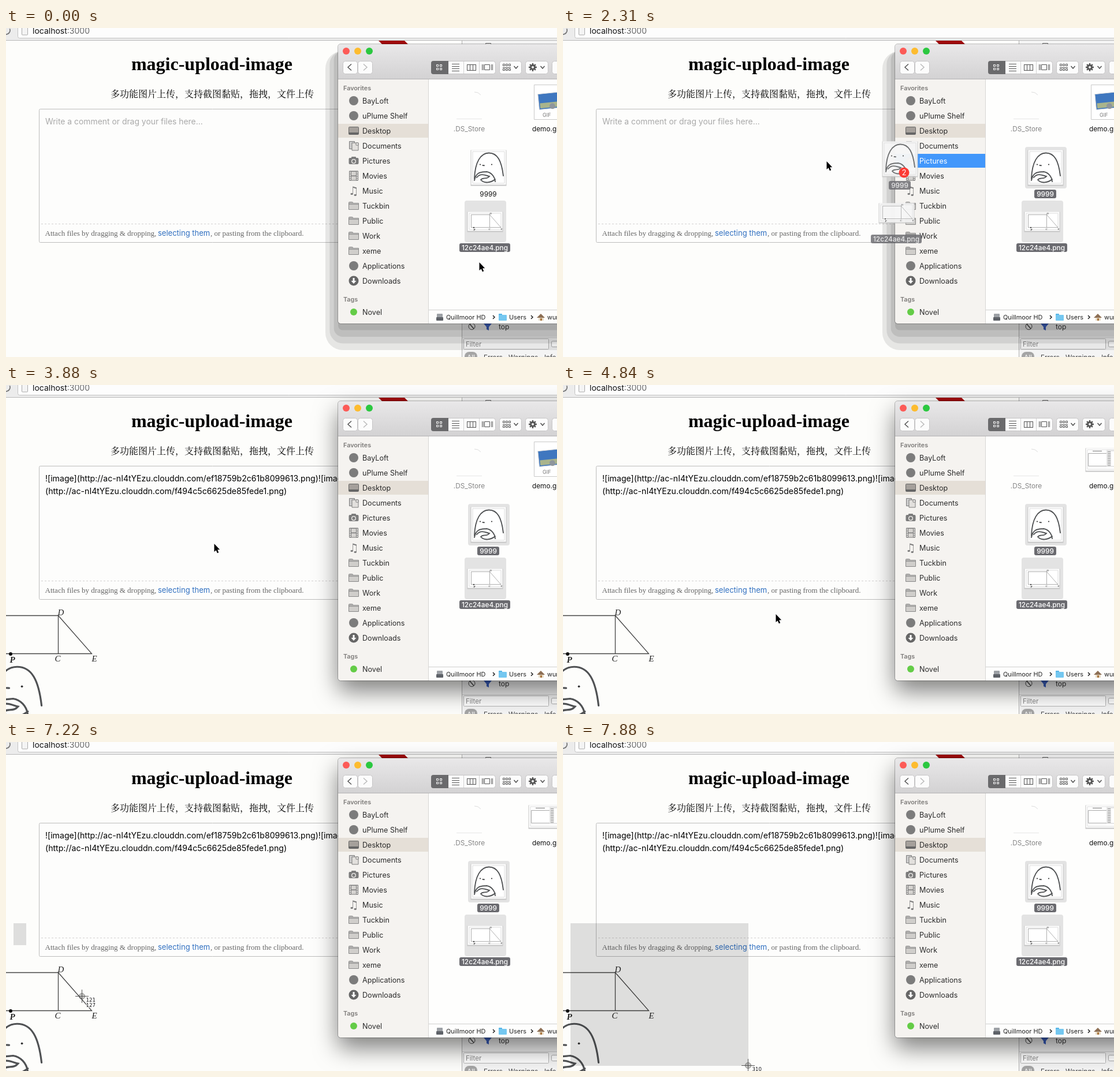
An HTML page with a canvas for the animation above (8 s loop, 954 by 570 pixels).

```html
<!DOCTYPE html>
<html lang="en">
<head>
<meta charset="utf-8">
<title>magic-upload-image</title>
<style>
html, body { margin: 0; width: 100%; height: 100%; overflow: hidden; background: #fdfdfb; }
canvas { display: block; }
</style>
</head>
<body>
<canvas id="stage" width="954" height="570"></canvas>
<script>
const c = document.getElementById('stage').getContext('2d');
const LOOP = 8000, LAG = 90;
const SANS = 'Inter, Roboto, sans-serif';
const SERIF = '"Liberation Serif", serif';
const CJK = '"Noto Serif CJK SC", "Noto Sans CJK SC", "Noto Sans CJK", sans-serif';
const GREY = '#7c7c7c', INK = '#2b2b2b';

// Moments of the story, in ms
const CLEAR = 480, PICK = 1100, BAND = 1384, BOTH = 1600, GRAB = 1870, DROP = 3170,
  DONE = 3640, PREVIEW = 3800, THUMB = 3990, CROSS = 6290, MARK = 7090;

const linear = k => k, easeOut = k => 1 - (1 - k) ** 2;
const legs = [];
const go = (from, to, x, y, ease = linear) => legs.push({ from, to, x, y, ease });

go(CLEAR, 860, 858, 247);
go(PICK, 1250, 872, 411);
go(BAND, 1520, 869, 281);
go(1520, BOTH, 834, 245);
go(GRAB, 2220, 583, 230);
go(2220, 2310, 456, 231);
go(2310, 2910, 362, 209);
go(DONE, 4430, 355, 424);
go(4520, 4840, 368, 397);
go(4840, 5020, 355, 404);
go(5340, 5520, 366, 401);
go(5880, 6140, 348, 402);
go(CROSS, 7010, 13, 314);
go(MARK, 7130, 33, 350);
go(7130, 7220, 130, 440);
go(7220, 7790, 320, 560, easeOut);

function pos(t) {
  let x = 819, y = 406;
  for (const l of legs) {
    if (t <= l.from) break;
    const k = l.ease(Math.min(1, (t - l.from) / (l.to - l.from)));
    x += (l.x - x) * k;
    y += (l.y - y) * k;
  }
  return { x: Math.round(x), y: Math.round(y) };
}

function paint(fill, stroke, width = 1) {
  if (fill) { c.fillStyle = fill; c.fill(); }
  if (stroke) { c.strokeStyle = stroke; c.lineWidth = width; c.stroke(); }
}

function rect(x, y, w, h, fill) { c.fillStyle = fill; c.fillRect(x, y, w, h); }

function box(x, y, w, h, r, fill, stroke) {
  c.beginPath(); c.roundRect(x, y, w, h, r); paint(fill, stroke);
}

function disc(x, y, r, fill, stroke) {
  c.beginPath(); c.arc(x, y, r, 0, 7); paint(fill, stroke);
}

function poly(points, stroke, width = 1, fill) {
  c.beginPath();
  points.forEach(([x, y]) => c.lineTo(x, y));
  if (fill) c.closePath();
  paint(fill, stroke, width);
}

function text(s, x, y, font, fill, align = 'left') {
  c.font = font; c.fillStyle = fill; c.textAlign = align;
  c.fillText(s, x, y);
}

function at(x, y, k, draw) {
  c.save(); c.translate(x, y); c.scale(k, k); draw(); c.restore();
}

const repeat = (n, fn) => { for (let i = 0; i < n; i++) fn(i); };

// The two uploaded pictures, shared by thumbnails and previews
function sketch() {
  c.lineCap = 'round';
  c.beginPath();
  c.moveTo(3, 47); c.bezierCurveTo(4, 18, 14, 2.5, 28, 2.5);
  c.bezierCurveTo(43, 2.5, 50, 16, 53, 42);
  c.moveTo(3, 50); c.bezierCurveTo(6, 34, 16, 36, 24, 35);
  c.bezierCurveTo(31, 36, 38, 42, 39, 52);
  c.moveTo(7, 45); c.bezierCurveTo(14, 36, 24, 42, 29, 43);
  c.bezierCurveTo(24, 49, 18, 44, 14, 49);
  c.bezierCurveTo(20, 56, 32, 54, 39, 48);
  c.moveTo(17.5, 24); c.lineTo(20, 24.2);
  paint(null, '#505254', 1.9);
  disc(13, 22.5, 1.1, '#333'); disc(33, 22.5, 1.1, '#333');
}

function figure() {
  poly([[-96, 66], [-96, 0], [0, 0], [58, 66], [-96, 66]], '#444', 1.3);
  poly([[0, 0], [0, 66]], '#444', 1.3);
  disc(-82.5, 66.5, 3, '#111');
  const f = 'italic 15px ' + SERIF;
  text('D', -1, -1, f, '#222'); text('C', -6, 79, f, '#222'); text('E', 58, 79, f, '#222');
  text('P', -84, 81, 'bold ' + f, '#222');
}

function frame(x, y, w, h) {
  rect(x - .5, y + .5, w + 2, h + 2, '#c6c6c6');
  rect(x + .5, y + .5, w, h, '#fff');
  box(x + 3, y + 3, w - 5, h - 5, 0, null, '#dcdcdc');
}

function sketchThumb() {
  frame(805, 211, 60, 60);
  at(808, 214, 1, sketch);
}

function figureThumb() {
  frame(799, 318, 60, 33);
  at(837.5, 323.5, 1 / 3, figure);
}

function label(s, x, y, w, on) {
  if (on) box(x - w / 2, y - 7.5, w, 15, 3, '#6b6b70');
  text(s, x, y + 4.3, (on ? '500 ' : '') + '11.8px ' + SANS, on ? '#fff' : '#111', 'center');
}

function file(thumb, name, x, y, w, on) {
  if (on) box(x, y, 72, 72, 4, '#e3e3e3');
  thumb();
  label(name, x + 35, y + 81.5, w, on);
}

function page(t) {
  rect(0, 0, 954, 570, '#fdfdfb');
  rect(0, 0, 954, 21, '#ececec');
  rect(0, 21, 954, 1, '#b9b9b9');
  box(20.5, -8, 980, 25.5, 3, '#fdfdfd', '#c2c2c2');
  c.beginPath(); c.arc(0, 4, 7, -.4, 2.2); paint(null, '#777', 1.8);
  box(27.5, -4, 10, 16, 1, '#f4f4f4', '#aaa');
  text('localhost', 46, 10, '14px ' + SANS, '#111');
  text(':3000', 46 + c.measureText('localhost').width, 10, '14px ' + SANS, '#666');
  poly([[645, 22], [690, 22], [698, 30], [653, 30]], null, 1, '#a00a0c');

  text('magic-upload-image', 356.5, 73, 'bold 32px ' + SERIF, '#000', 'center');
  text('多功能图片上传，支持截图黏贴，拖拽，文件上传', 181, 120, '500 16px ' + CJK, '#000');

  const busy = t >= DROP && t < DONE;
  box(57.5, 140.5, 600, busy ? 230 : 231, 2, '#fdfdfc', '#bcbcbc');
  c.setLineDash([3, 3]);
  poly([[61, 339.5], [600, 339.5]], '#d2d0d0');
  c.setLineDash([]);

  if (t >= DONE) {
    const body = '14.12px ' + SANS;
    text('![image](http://ac-nI4tYEzu.clouddn.com/ef18759b2c61b8099613.png)![image]', 68, 167, body, '#000');
    text('(http://ac-nI4tYEzu.clouddn.com/f494c5c6625de85fede1.png)', 68, 189, body, '#000');
  } else text('Write a comment or drag your files here...', 68, 167, '13.9px ' + SANS, '#a9a9a9');

  const note = '13px ' + SERIF;
  if (busy) text('Uploading your files… 100', 67.5, 359, note, '#555');
  else {
    text('Attach files by dragging & dropping,', 67.5, 360, note, '#666');
    text('selecting them', 263, 360, '13px ' + SANS, '#2f6fc0');
    text(', or pasting from the clipboard.', 354, 360, note, '#666');
  }
  if (t >= PREVIEW) {
    at(90.5, 399.5, 1, figure);
    at(-28.5, 484, 1.7, sketch);
  }
}

function devtools() {
  rect(789, 22, 165, 548, '#f4f4f4');
  rect(789, 22, 1, 548, '#b0b0b0');
  box(830.5, 26.5, 9, 8, 0, null, '#666');
  rect(790, 536, 164, 1, '#cfcfcf');
  disc(806.5, 517, 5.5, null, '#444'); poly([[803, 513], [810, 521]], '#444', 1.5);
  poly([[827, 512], [841, 512], [836, 518], [836, 524], [832, 522], [832, 518]], null, 1, '#3c62c4');
  text('top', 853, 522, '12px ' + SANS, '#333');
  box(792.5, 538.5, 147, 18, 1, '#fff', '#b5b5b5');
  text('Filter', 796, 552, '11.5px ' + SANS, '#8a8a8a');
  box(944.5, 542.5, 16, 10, 2, '#fff', '#aaa');
  box(794, 561, 22, 16, 8, '#a5a5a5');
  const tabs = '11.5px ' + SANS;
  text('All', 805, 575, tabs, '#fff', 'center');
  text('Errors', 827, 575, tabs, '#444');
  text('Warnings', 870, 575, tabs, '#444');
  text('Info', 932, 575, tabs, '#444');
}

function bandedShadow() {
  repeat(4, i => {
    const k = 1 - i / 3, bottom = 558 - 11.5 * i;
    box(575 - 22 * k, 40, 500, bottom - 40, 8 + 22 * k, 'rgba(0,0,0,.09)');
  });
}

function softShadow() {
  c.save();
  c.shadowColor = 'rgba(0,0,0,.5)'; c.shadowBlur = 40; c.shadowOffsetY = 18;
  box(575, 28, 500, 484, 5, '#fff');
  c.restore();
}

// Sidebar icons, each drawn around 0,0
const icons = {
  dot() { disc(0, 0, 8, GREY); },
  desktop() { box(-8.5, -6.5, 17, 13, 1, '#a5a09b', '#666'); rect(-8, 3, 16, 3, '#666'); },
  docs() {
    box(-7.5, -7.5, 9, 13, 0, '#ccc', GREY);
    box(-3, -5, 11, 13, 0, '#e2e0dd', GREY);
    box(4, -5, 4, 4, 0, '#f4f2ef', GREY);
  },
  camera() {
    box(-8.5, -5, 17, 11, 2, GREY); box(-4, -7, 8, 4, 1, GREY);
    disc(0, 1, 4, '#f3f1ee'); disc(0, 1, 2.7, GREY);
  },
  film() {
    box(-8, -8.5, 16, 17, 1, GREY);
    rect(-4, -7, 8, 6.5, '#d5d3d0'); rect(-4, 1, 8, 6.5, '#d5d3d0');
    repeat(5, i => { rect(-7, 3 * i - 7, 2, 2, '#f3f1ee'); rect(5, 3 * i - 7, 2, 2, '#f3f1ee'); });
  },
  note() { text('♫', 0, 7, '20px "DejaVu Sans", sans-serif', GREY, 'center'); },
  folder() {
    box(-8.5, -6.5, 7, 5, 1, '#d0cecb', '#888');
    box(-8.5, -4.5, 17, 11, 0, '#d0cecb', '#888');
    rect(-8, -3, 16, 1, '#888');
  },
  down() {
    disc(0, 0, 8.5, '#666');
    rect(-1.5, -5, 3, 6, '#fff');
    poly([[-4.5, 0], [4.5, 0], [0, 5]], null, 1, '#fff');
  }
};
const rows = [['BayLoft', 'dot'], ['uPlume Shelf', 'dot'], ['Desktop', 'desktop'], ['Documents', 'docs'],
  ['Pictures', 'camera'], ['Movies', 'film'], ['Music', 'note'], ['Tuckbin', 'folder'], ['Public', 'folder'],
  ['Work', 'folder'], ['xeme', 'folder'], ['Applications', 'dot'], ['Downloads', 'down']];

function sidebar(hover) {
  rect(575, 89, 156, 423, '#f5f3f0');
  rect(731, 89, 1, 423, '#d8d6d4');
  const head = '600 10.8px ' + SANS, item = '12.6px ' + SANS;
  text('Favorites', 584, 108, head, '#7d7b79');
  rows.forEach(([name, icon], i) => {
    const y = 126 + 26 * i;
    if (i === 2) rect(575, y - 12, 156, 24, '#e5dfd7');
    if (i === hover) rect(575, y - 12, 156, 24, '#4297fb');
    at(602, y, 1, icons[icon]);
    text(name, 617, y + 4.7, item, i === hover ? '#fff' : INK);
  });
  text('Tags', 584, 474, head, '#7d7b79');
  disc(602, 492, 6, '#64cc47');
  text('Novel', 617, 496.7, item, INK);
}

function chevron(x, y, w, h, color) {
  poly([[x - w, y - h], [x, y], [x - w, y + h]], color, 1.5);
}

function caret(x, y) { poly([[x - 3.5, y - 2], [x, y + 2], [x + 3.5, y - 2]], '#555', 1.5); }

function button(x, w) { box(x + .5, 57.5, w, 22, 4, '#fcfcfc', '#c6c5c6'); }

function toolbar() {
  const g = c.createLinearGradient(0, 28, 0, 88);
  g.addColorStop(0, '#e9e8e9'); g.addColorStop(1, '#d3d2d3');
  rect(575, 28, 379, 60, g);
  rect(575, 88, 379, 1, '#b4b3b4');
  ['#fc5b57', '#fdbc2f', '#2bc840'].forEach((f, i) => disc(589 + 20 * i, 40, 6, f));

  button(583, 25); chevron(592, 68, -6, 5.5, '#555');
  button(609, 25); chevron(625, 68, 6, 5.5, '#bbb');

  button(736, 111);
  box(736, 57, 30, 23, [4, 0, 0, 4], '#6a6a6c');
  repeat(4, i => {
    box(745.5 + 6 * (i % 2), 63.5 + 6 * (i >> 1), 3, 3, 0, null, '#fff');
    rect(772, 62 + 4 * i, 13, 1, '#555');
    rect(798 + 5 * i, 63, 1, 11, '#555');
    rect(824 + 2 * i + (i > 1 ? 12 : 0), 63, 1, 10, '#666');
  });
  rect(792, 58, 1, 21, '#d2d2d2'); rect(819, 58, 1, 21, '#d2d2d2');
  rect(798, 63, 15, 1, '#555'); rect(798, 73, 15, 1, '#555');
  box(828.5, 63.5, 9, 9, 0, null, '#555');

  button(854, 38); caret(883, 68);
  rect(860, 68, 14, 1, '#555');
  repeat(6, i => box(860.5 + 5 * (i % 3), i < 3 ? 62.5 : 70.5, 3, 3, 0, null, '#555'));

  button(899, 39); caret(929, 68);
  repeat(8, i => {
    const a = i * Math.PI / 4;
    poly([[912, 68], [912 + 7 * Math.cos(a), 68 + 7 * Math.sin(a)]], '#555', 2.4);
  });
  disc(912, 68, 5, '#555'); disc(912, 68, 2, '#fcfcfc');
  button(945, 40);
}

function pathBar() {
  rect(732, 488, 222, 1, '#cfcfcf');
  const f = '10.9px ' + SANS;
  box(746, 495, 10, 7, 1, '#9da1a6'); box(745, 501, 12, 6, 1, '#5e6268');
  text('Quillmoor HD', 762, 505, f, '#222');
  chevron(846, 501, 3, 3, '#222'); chevron(912, 501, 3, 3, '#222');
  box(853, 495, 6, 4, 1, '#55b5e6'); box(853, 497, 14, 10, 1, '#74c7f0');
  text('Users', 871, 505, f, '#222');
  rect(922, 501, 9, 6, '#e7dcc8'); poly([[919, 502], [926, 495], [933, 502]], null, 1, '#8d6f55');
  rect(925, 503, 3, 4, '#a8743c');
  text('wumlo', 937, 505, f, '#222');
}

function demoFile(t) {
  if (t < THUMB) {
    box(914.5, 98.5, 45, 60, 0, '#fff', '#c9c9c9');
    at(938, 126, 1, () => {
      c.rotate(-.1);
      box(-16, -13, 34, 27, 0, '#3f77bf', '#ddd');
      rect(-14, 3, 30, 9, '#a9b48c');
      disc(7, 10, 5, '#8f969c');
    });
    text('GIF', 929, 154, '9px ' + SANS, '#777');
  } else {
    frame(905, 109, 61, 39);
    box(909.5, 118.5, 32, 22, 0, null, '#aaa');
    rect(917, 114, 16, 1, '#777');
    rect(941, 112, 13, 30, '#e6e6e6');
    repeat(9, i => rect(943, 115 + 3 * i, 5, 1, '#999'));
    rect(949, 115, 5, 25, '#fff');
  }
  text('demo.gif', 911, 179, '11.8px ' + SANS, '#111');
}

function finder(t, hover) {
  if (t < DONE) bandedShadow(); else softShadow();
  c.save();
  c.beginPath(); c.roundRect(575, 28, 500, 484, 5); c.clip();
  rect(575, 28, 379, 484, '#fefefd');
  toolbar(); sidebar(hover); pathBar();

  rect(780, 157, 44, 1, '#e6e6e6');
  poly([[811, 111], [817, 112], [822, 116]], '#ddd');
  text('.DS_Store', 802, 179, '11.8px ' + SANS, '#858585', 'center');
  demoFile(t);
  file(sketchThumb, '9999', 800, 206, 38, t >= BOTH || t >= PICK && t < BAND);
  file(figureThumb, '12c24ae4.png', 794, 299, 88, t >= BOTH || t < CLEAR);
  c.restore();
  box(574.5, 27.5, 500, 485, 5, null, 'rgba(0,0,0,.25)');
}

function dragged(p) {
  c.save();
  c.globalAlpha = .82;
  c.translate(p.x - 834, p.y - 245);
  sketchThumb(); label('9999', 835, 287.5, 38, true);
  figureThumb(); label('12c24ae4.png', 829, 380.5, 88, true);
  c.restore();
  disc(p.x + 8.5, p.y + 20.5, 9, '#fb3b35');
  text('2', p.x + 8.5, p.y + 25, '12.5px ' + SANS, '#fff', 'center');
}

function arrow() {
  const tip = [[0, 0], [0, 14.5], [3.3, 11.5], [5.5, 16.8], [8, 15.8], [5.8, 10.6], [10, 10.6]];
  c.lineJoin = 'round';
  poly(tip, '#fff', 2, '#fff'); poly(tip, null, 1, '#000');
}

function crosshair({ x, y }, ...sizes) {
  disc(x + .5, y + .5, 5, 'rgba(120,120,120,.4)', 'rgba(70,70,70,.6)');
  rect(x - 11, y, 23, 1, '#555'); rect(x, y - 11, 1, 23, '#555');
  c.strokeStyle = 'rgba(255,255,255,.85)'; c.lineWidth = 2;
  c.font = '8.6px "DejaVu Sans", sans-serif'; c.textAlign = 'left'; c.fillStyle = '#111';
  sizes.forEach((n, i) => {
    c.strokeText(n, x + 7.5, y + 10 + 9 * i);
    c.fillText(n, x + 7.5, y + 10 + 9 * i);
  });
}

function draw(t) {
  const p = pos(t), tail = pos(t - LAG);
  const drag = t >= GRAB && t < DROP;
  const hover = drag && tail.x > 575 && tail.x < 731 ? Math.floor((tail.y - 114) / 26) : -1;
  page(t);
  devtools();
  finder(t, hover);
  if (t >= BAND && t < BOTH + LAG) {
    box(tail.x + .5, tail.y + .5, 871 - tail.x, 409 - tail.y, 0, 'rgba(0,0,0,.05)', '#c6c6c6');
  }
  if (drag) dragged(tail);
  if (t < CROSS) return at(p.x + .5, p.y, .97, arrow);
  if (t < MARK) return crosshair(p, p.x, p.y);
  rect(13, 314, tail.x - 12, tail.y - 313, 'rgba(0,0,0,.12)');
  crosshair(p, p.x - 10, p.y - 313);
}

const start = performance.now();
function tick() {
  draw((performance.now() - start) % LOOP);
  requestAnimationFrame(tick);
}
tick();
</script>
</body>
</html>
```
